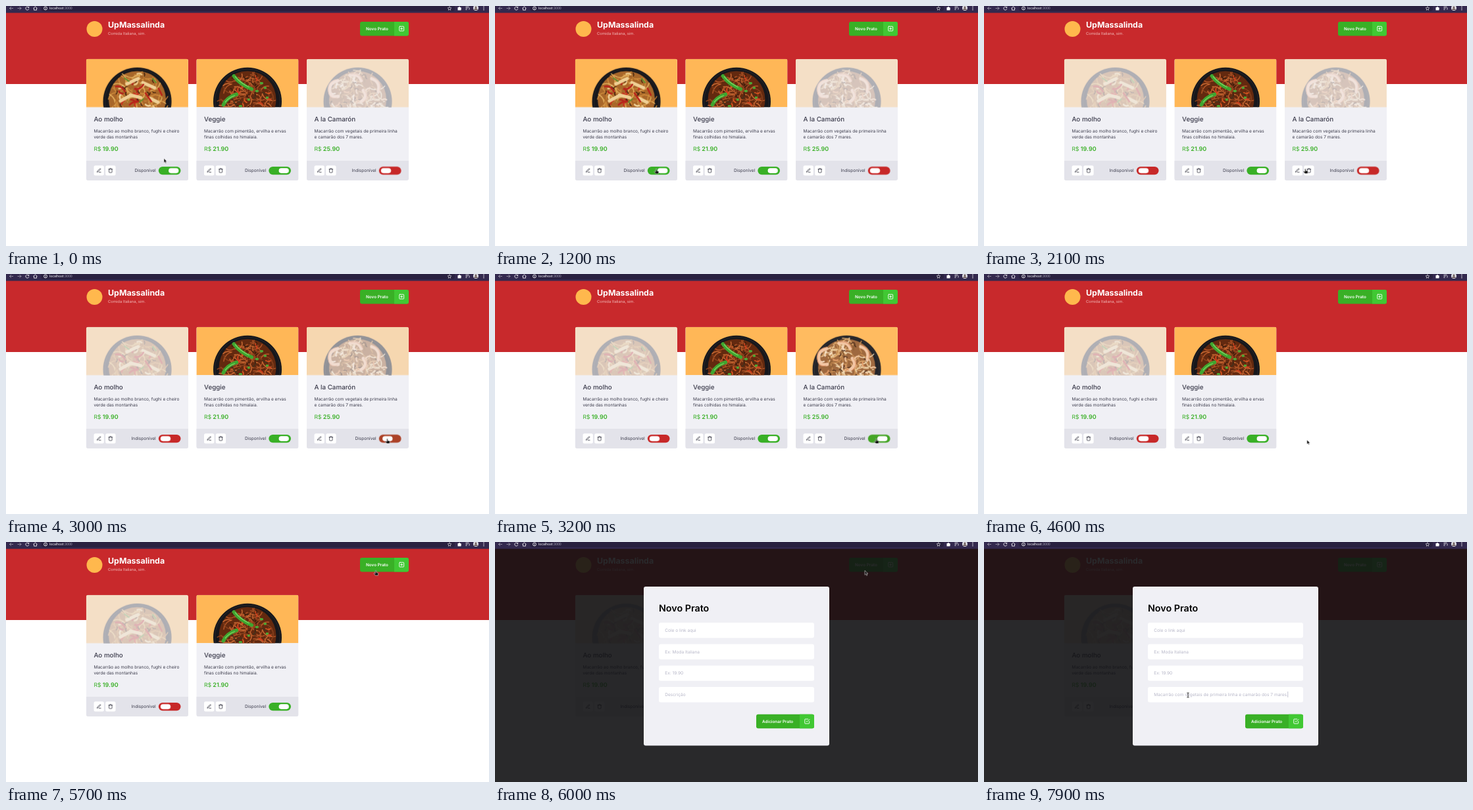
An HTML page that plays this animation: 734 by 366 pixels, repeating every 8 s.

```html
<!DOCTYPE html>
<html lang="pt-BR">
<head>
<meta charset="utf-8">
<title>Pratos</title>
<style>
html, body { margin: 0; width: 100%; height: 100%; overflow: hidden; background: #fff; }
svg { display: block; font: 6.55px Inter, sans-serif; text-rendering: geometricPrecision; }
text { fill: #3d3d4d; }
.bold { font-weight: 600; }
.white { fill: #fff; }
.green { fill: #39b026; }
.lime { fill: #41c833; }
.hint { fill: #b7b7c8; }
.line { fill: none; stroke: #2f2f3d; stroke-width: 2.3; stroke-linecap: round; stroke-linejoin: round; }
.line.w { stroke: #fff; }

.photo, .track, .knob { animation: 8s infinite; }
.cut { animation: 8s step-end infinite; }

/* toggles */
.on .knob { transform: translateX(12.25px); }
.on .track { fill: #39b026; }
.off .track { fill: #c72828; }
.off .photo { opacity: .3; }
.on .no, .off .yes { opacity: 0; }

.c0 .photo { animation-name: dim; }
.c0 .knob { animation-name: slide-off; }
.c0 .track { animation-name: redden; }
.c0 .yes { animation-name: hide-yes; }
.c0 .no { animation-name: show-no; }
.c2 .photo { animation-name: lit; }
.c2 .knob { animation-name: slide-on; }
.c2 .track { animation-name: green; }
.c2 .yes { animation-name: show-yes; }
.c2 .no { animation-name: hide-no; }

@keyframes dim { 0%, 21% { opacity: 1; animation-timing-function: ease } 26%, 100% { opacity: .3 } }
@keyframes slide-off { 0%, 21% { transform: translateX(12.25px); animation-timing-function: ease } 26%, 100% { transform: none } }
@keyframes redden { 0%, 21% { fill: #39b026; animation-timing-function: ease } 26%, 100% { fill: #c72828 } }
@keyframes hide-yes { 0% { opacity: 1 } 21.25%, 100% { opacity: 0 } }
@keyframes show-no { 0% { opacity: 0 } 21.25%, 100% { opacity: 1 } }
@keyframes lit { 0%, 36.75% { opacity: .3; animation-timing-function: ease } 41.75%, 100% { opacity: 1 } }
@keyframes slide-on { 0%, 36.75% { transform: none; animation-timing-function: ease } 41.75%, 100% { transform: translateX(12.25px) } }
@keyframes green { 0%, 36.75% { fill: #c72828; animation-timing-function: ease } 41.75%, 100% { fill: #39b026 } }
@keyframes show-yes { 0% { opacity: 0 } 36.25%, 100% { opacity: 1 } }
@keyframes hide-no { 0% { opacity: 1 } 36.25%, 100% { opacity: 0 } }

/* page changes */
.c2 { animation-name: remove; }
.modal { animation-name: open; }
.empty { animation-name: clear; }
.pasted { animation-name: paste; }
.caret { animation-name: caret; }
@keyframes remove { 0% { opacity: 1 } 57.5%, 100% { opacity: 0 } }
@keyframes open { 0% { opacity: 0 } 75%, 100% { opacity: 1 } }
@keyframes clear { 0% { opacity: 1 } 98.75%, 100% { opacity: 0 } }
@keyframes paste { 0% { opacity: 0 } 98.75%, 100% { opacity: 1 } }
@keyframes caret { 0% { opacity: 0 } 90% { opacity: 1 } 97.5%, 100% { opacity: 0 } }

/* pointer */
.pointer { animation: move 8s infinite ease-in-out; }
.arrow { animation-name: arrow; }
.hand { animation-name: hand; }
.beam { animation-name: beam; }
@keyframes move {
  0%, 8.75% { transform: translate(240px, 232.5px) }
  15%, 22.5% { transform: translate(245px, 248.3px); animation-timing-function: ease-in }
  26.25% { transform: translate(488px, 248px); animation-timing-function: ease-out }
  31.25% { transform: translate(580px, 249.5px) }
  33.75%, 41.25% { transform: translate(579.5px, 251px) }
  46.25% { transform: translate(502px, 253px); animation-timing-function: ease-out }
  48.75%, 58.75% { transform: translate(490.7px, 253px) }
  70% { transform: translate(570px, 45px) }
  71.25%, 78.75% { transform: translate(562px, 43.5px) }
  87.5%, 100% { transform: translate(310px, 233.5px) }
}
@keyframes arrow {
  0% { opacity: 1 } 13.75% { opacity: 0 } 23.5% { opacity: 1 } 26% { opacity: 0 }
  27.4% { opacity: 1 } 29% { opacity: 0 } 42.5% { opacity: 1 } 47% { opacity: 0 }
  57.5% { opacity: 1 } 69.5% { opacity: 0 } 75% { opacity: 1 } 84.5%, 100% { opacity: 0 }
}
@keyframes hand {
  0% { opacity: 0 } 13.75% { opacity: 1 } 23.5% { opacity: 0 } 26% { opacity: 1 }
  27.4% { opacity: 0 } 29% { opacity: 1 } 42.5% { opacity: 0 } 47% { opacity: 1 }
  57.5% { opacity: 0 } 69.5% { opacity: 1 } 75%, 100% { opacity: 0 }
}
@keyframes beam { 0% { opacity: 0 } 84.5%, 100% { opacity: 1 } }
</style>
</head>
<body>
<svg id="stage" width="734" height="366" viewBox="0 0 734 366"></svg>
<script>
const rect = (x, y, w, h, r, attrs = '') =>
  `<rect x="${x}" y="${y}" width="${w}" height="${h}" rx="${r}" ${attrs}/>`;
const text = (x, y, str, attrs = '') => `<text x="${x}" y="${y}" ${attrs}>${str}</text>`;
const icon = (x, y, scale, d, cls = '') =>
  `<path class="line ${cls}" transform="translate(${x} ${y}) scale(${scale})" d="${d}"/>`;
const stroke = (color, width, d) => `<path stroke="${color}" stroke-width="${width}" d="${d}"/>`;

const icons = {
  edit: 'M12 20h9M16.5 3.5a2.1 2.1 0 0 1 3 3L7 19l-4 1 1-4z',
  trash: 'M3 6h18M19 6v14a2 2 0 0 1-2 2H7a2 2 0 0 1-2-2V6m3 0V4a2 2 0 0 1 2-2h4a2 2 0 0 1 2 2v2',
  plus: 'M5 3h14a2 2 0 0 1 2 2v14a2 2 0 0 1-2 2H5a2 2 0 0 1-2-2V5a2 2 0 0 1 2-2zM12 8v8M8 12h8',
  check: 'M9 11l3 3L22 4M21 12v7a2 2 0 0 1-2 2H5a2 2 0 0 1-2-2V5a2 2 0 0 1 2-2h11'
};

const dishes = [
  { name: 'Ao molho', price: '19.90', state: 'on', seed: 7,
    lines: ['Macarrão ao molho branco, fughi e cheiro', 'verde das montanhas'],
    base: '#a8672a', noodles: ['#d18f3e', '#e2ae5c', '#b06a28', '#c88238'],
    bits: ['#b3261c', '#ecc787', '#a87a30', '#c8321f', '#f0d49c'], bitWidth: 2.6,
    toppings:
      stroke('#efcf95', 5, 'M62 38l17-8M86 36l18 8M67 55l16 4M52 64l13-7M97 60l12 6') +
      stroke('#b9241b', 2.6, 'M45 42q9-2 14 8M74 46q8 1 13-7M90 52l9 13M66 70q5-6 14-5M110 45l5 10') +
      stroke('#5f8f2c', 2, 'M58 29l7 5M101 30l5 6M81 66l6-5') },
  { name: 'Veggie', price: '21.90', state: 'on', seed: 21,
    lines: ['Macarrão com pimentão, ervilha e ervas', 'finas colhidas no himalaia.'],
    base: '#63290f', noodles: ['#b05426', '#c96a33', '#87401c', '#9c4a22'],
    bits: ['#cc3d1c', '#d9531f', '#46301a'], bitWidth: 1.8,
    toppings:
      stroke('#3fa52f', 5.5, 'M57 26q9 13 27 20M41 70q5-11 20-16') +
      stroke('#83d565', 1.2, 'M59 27q8 10 21 16M44 66q5-7 14-10') +
      stroke('#4da834', 3.5, 'M91 49h2M104 44h1M98 37h2M107 59h1M79 62h1M66 72h2') },
  { name: 'A la Camarón', price: '25.90', state: 'off', seed: 40,
    lines: ['Macarrão com vegetais de primeira linha', 'e camarão dos 7 mares.'],
    base: '#9a6034', noodles: ['#dfa868', '#efcd9a', '#c58748', '#f2dab2'],
    bits: ['#f0c095', '#e0965f', '#f6dcc0', '#8c5a2c'], bitWidth: 2.2,
    toppings:
      stroke('#f3c4a0', 5, 'M47 33q-13 3-12 15t13 9M66 25q13-4 17 8M99 30q14 4 10 20M86 48q8 10-3 17') +
      stroke('#dc8a5a', 1.1, 'M47 31q-15 3-14 17t13 11M67 23q13-2 18 9M100 28q15 6 11 21M88 48q8 10-2 18') }
];

function random(seed) {
  return () => (seed = (seed * 16807) % 2147483647) / 2147483647;
}

// Pan of noodles inside a 155 x 73.5 picture
function photo(dish) {
  const rnd = random(dish.seed * 9973);
  const pick = list => list[Math.floor(rnd() * list.length)];
  const strand = (colors, len, width) => {
    const a = rnd() * Math.PI * 2, d = Math.sqrt(rnd()) * 41, turn = rnd() * Math.PI * 2;
    const dx = len * Math.cos(turn), dy = len * Math.sin(turn);
    const [x, y, cx, cy, ex, ey] = [
      77.5 + d * Math.cos(a) - dx / 2, 62 + d * Math.sin(a) - dy / 2,
      dx / 2 - dy * .35, dy / 2 + dx * .35, dx, dy
    ].map(n => n.toFixed(1));
    return stroke(pick(colors), width, `M${x} ${y}q${cx} ${cy} ${ex} ${ey}`);
  };
  let s = rect(0, 0, 155.2, 73.5, 0, 'fill="#ffb757"') +
    '<circle cx="77.7" cy="65" r="52" fill="#17171b"/>' +
    '<circle cx="77.7" cy="65" r="49.5" fill="none" stroke="#2a2a2e" stroke-width=".8"/>' +
    `<circle cx="77.7" cy="62" r="43.5" fill="${dish.base}"/><g fill="none" stroke-linecap="round">`;
  for (let i = 0; i < 110; i++) s += strand(dish.noodles, 10 + rnd() * 10, 1.5);
  for (let i = 0; i < 28; i++) s += strand(dish.bits, 7, dish.bitWidth);
  for (let i = 0; i < 22; i++) s += strand(['#3a1c0c'], 5, 1.3);
  return s + dish.toppings + '</g>';
}

function card(dish, i) {
  const [l1, l2] = dish.lines;
  return `<g class="cut c${i}"><g class="${dish.state}" transform="translate(${121.8 + i * 167.5} 80.7)" clip-path="url(#card)">` +
    rect(0, 0, 155.2, 185.2, 0, 'fill="#f0f0f5"') +
    `<g class="photo" clip-path="url(#pic)">${photo(dish)}</g>` +
    text(11.7, 95.6, dish.name, 'font-size="9.8" font-weight="450"') +
    text(11.7, 112, l1) + text(11.7, 121.6, l2) +
    text(11.7, 139.9, 'R$', 'class="green" font-size="8.7"') +
    text(25, 139.9, dish.price, 'class="green bold" font-size="9"') +
    rect(0, 155.3, 155.2, 30, 0, 'fill="#e3e3ea"') +
    rect(11.7, 162.5, 15.4, 15.3, 2.5, 'fill="#fff"') + icon(15.6, 166.3, .32, icons.edit) +
    rect(29.4, 162.5, 15.4, 15.3, 2.5, 'fill="#fff"') + icon(33.2, 166.3, .32, icons.trash) +
    text(105.8, 172.7, 'Disponível', 'class="cut yes" text-anchor="end"') +
    text(105.8, 172.7, 'Indisponível', 'class="cut no" text-anchor="end"') +
    rect(110, 164.2, 33.7, 12.3, 6.1, 'class="track"') +
    rect(113, 166.5, 15.3, 7.7, 3.85, 'class="knob" fill="#fff"') +
    '</g></g>';
}

function button(x, y, w, label, glyph) {
  return rect(x, y, w, 21.5, 3, 'class="green"') +
    `<path class="lime" d="M${x + w - 22} ${y}h19a3 3 0 0 1 3 3v15.5a3 3 0 0 1-3 3h-19z"/>` +
    text(x + 9, y + 13.1, label, 'class="white bold" font-size="6.35"') +
    icon(x + w - 15.4, y + 6.1, .383, glyph, 'w');
}

const browser = rect(0, 0, 734, 10.5, 0, 'fill="#33294e"') +
  rect(53, -4, 629, 12, 4, 'fill="#292140"') +
  '<g fill="none" stroke="#fff" stroke-width=".8">' +
  '<path opacity=".55" d="M11 3.5H5.5M8 1L5.5 3.5 8 6M17.5 3.5H23M20.5 1L23 3.5 20.5 6"/>' +
  '<path d="M34.3 2A2.5 2.5 0 1 0 34.8 4.2M34.8 .8V2.5H33M41.5 3.5L44.5 1l3 2.5M42.5 3.2V6.2h4V3.2"/>' +
  '<circle cx="60" cy="3.5" r="2.5"/><path d="M60 3.2V5M60 1.8v.7"/>' +
  '<path stroke-width=".6" d="M674 .8l.8 1.9 2 .2-1.5 1.4.4 2-1.7-1-1.7 1 .4-2-1.5-1.4 2-.2z"/>' +
  '<path d="M698.5 1.5h5M698.5 3.5h3M698.5 5.5h2M704 2.5v3"/></g>' +
  '<g fill="#fff"><path d="M686.5 2h1.5a1 1 0 0 1 2 0h1.5v1.5a.8.8 0 0 1 0 1.5v1.5h-5z"/>' +
  '<circle cx="726" cy="1.3" r=".7"/><circle cx="726" cy="3.5" r=".7"/><circle cx="726" cy="5.7" r=".7"/></g>' +
  '<circle cx="714" cy="3" r="4" fill="#dfe0e6"/><circle cx="714" cy="2" r="1.5" fill="#6b5a58"/>' +
  '<path d="M711.3 6a2.7 2.5 0 0 1 5.4 0z" fill="#6b5a58"/>' +
  '<text x="66" y="5.3" font-size="5.3" style="font-family:Roboto,sans-serif;fill:#f1f0f5">localhost<tspan fill="#a39fb3">:3000</tspan></text>';

const header = rect(0, 10, 734, 109, 0, 'fill="#c8292c"') +
  '<circle cx="134.5" cy="35" r="12" fill="#ffb84d"/>' +
  text(155, 33.2, 'UpMassalinda', 'class="white" font-size="12.4" font-weight="700"') +
  text(155, 44.3, 'Comida Italiana, sim.', 'font-size="5.85" style="fill:#f0b9b7"') +
  button(538, 23.9, 74, 'Novo Prato', icons.plus);

const hints = ['Cole o link aqui', 'Ex: Moda Italiana', 'Ex: 19.90', 'Descrição'];
const modal = '<g class="cut modal">' +
  rect(0, 10, 734, 356, 0, 'fill="#121214" opacity=".9"') +
  rect(226, 68, 282, 242.5, 3, 'fill="#f0f0f5"') +
  text(249, 105.7, 'Novo Prato', 'class="bold" font-size="14.3" style="fill:#000"') +
  hints.map((hint, i) => {
    const y = 123 + i * 32.7;
    return rect(249, y, 236, 23.3, 3, 'fill="#fff"') +
      text(258.3, y + 14, hint, `class="hint ${i === 3 ? 'cut empty' : ''}"`);
  }).join('') +
  rect(258, 228, 1, 9, 0, 'class="cut caret" fill="#b7b7c8"') +
  '<g class="cut pasted">' +
  text(258.3, 235.1, 'Macarrão com vegetais de primeira linha e camarão dos 7 mares.', 'class="hint" font-size="6.6"') +
  rect(461.4, 228, .8, 9, 0, 'fill="#b7b7c8"') + '</g>' +
  button(397, 262.8, 88, 'Adicionar Prato', icons.check) + '</g>';

const pointer = '<g class="pointer"><g stroke="#fff" stroke-width=".5" fill="#111">' +
  '<path class="cut arrow" d="M0 0V6.6L1.6 5.2 2.7 7.6 3.8 7.1 2.7 4.8H4.8Z"/>' +
  '<path class="cut hand" d="M-.8 .8a.8 .8 0 0 1 1.6 0V3l2.2 .6q1 .3 .9 1.3l-.6 2.6h-4l-2.4-3q.3-1 1.3-.5l1 .8z"/></g>' +
  '<path class="cut beam" fill="none" stroke="#444" d="M-1.8-3.3H1.8M0-3.3V3.3M-1.8 3.3H1.8"/></g>';

document.getElementById('stage').innerHTML =
  `<defs><clipPath id="card">${rect(0, 0, 155.2, 185.2, 3)}</clipPath>` +
  `<clipPath id="pic">${rect(0, 0, 155.2, 73.5, 0)}</clipPath></defs>` +
  header + dishes.map(card).join('') + modal + browser + pointer;
</script>
</body>
</html>
```
